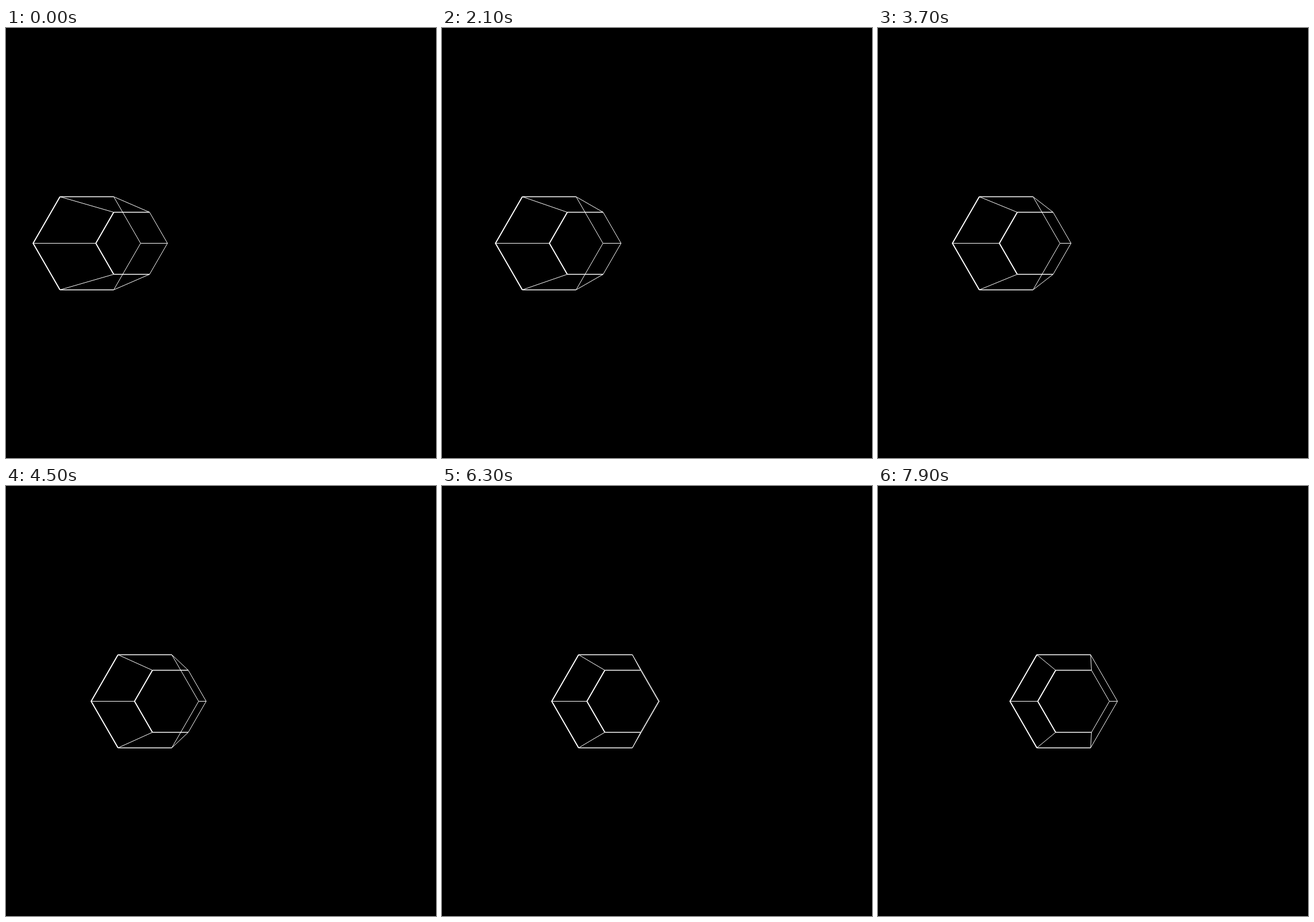
These frames come from a looping animation (748x748 px, 8000 ms). An HTML page with a canvas:

```html
<!DOCTYPE html>
<html lang="en">
<head>
<meta charset="utf-8">
<title>Hexagonal prism</title>
<style>
  html, body { margin: 0; width: 100%; height: 100%; overflow: hidden; background: #000; }
  canvas { display: block; }
</style>
</head>
<body>
<canvas id="stage" width="748" height="748"></canvas>
<script>
const ctx = document.getElementById('stage').getContext('2d');
const LOOP = 8000, STEP = 100;
const CX = 374.4, CY = 374.5;
const NEAR = 748 / 8, FAR = 748 / 12; // pixels per unit at each depth
const SWING = 5;

function hexagon(shift, scale) {
  return Array.from({ length: 6 }, (_, i) => {
    const a = i * Math.PI / 3;
    return [CX + (shift + Math.cos(a)) * scale, CY + Math.sin(a) * scale];
  });
}

function path(points, width) {
  ctx.lineWidth = width;
  ctx.beginPath();
  points.forEach(p => ctx.lineTo(...p));
  ctx.stroke();
}

function outline(h) {
  path([h[5], h[0], h[1]], 1);
  path([h[1], h[2]], 1.5);
  path([h[4], h[5]], 1.5);
  path([h[2], h[3], h[4]], 1.9);
}

function draw(time) {
  const step = Math.floor(time % LOOP / STEP);
  const shift = SWING * Math.sin((step * 0.3 - 30) * Math.PI / 180);
  const near = hexagon(shift, NEAR), far = hexagon(shift, FAR);
  ctx.fillStyle = '#000';
  ctx.fillRect(0, 0, 748, 748);
  ctx.strokeStyle = '#fff';
  near.forEach((p, i) => path([p, far[i]], 1));
  outline(near);
  outline(far);
}

const start = performance.now();
function frame() {
  draw(performance.now() - start);
  requestAnimationFrame(frame);
}
frame();
</script>
</body>
</html>
```
